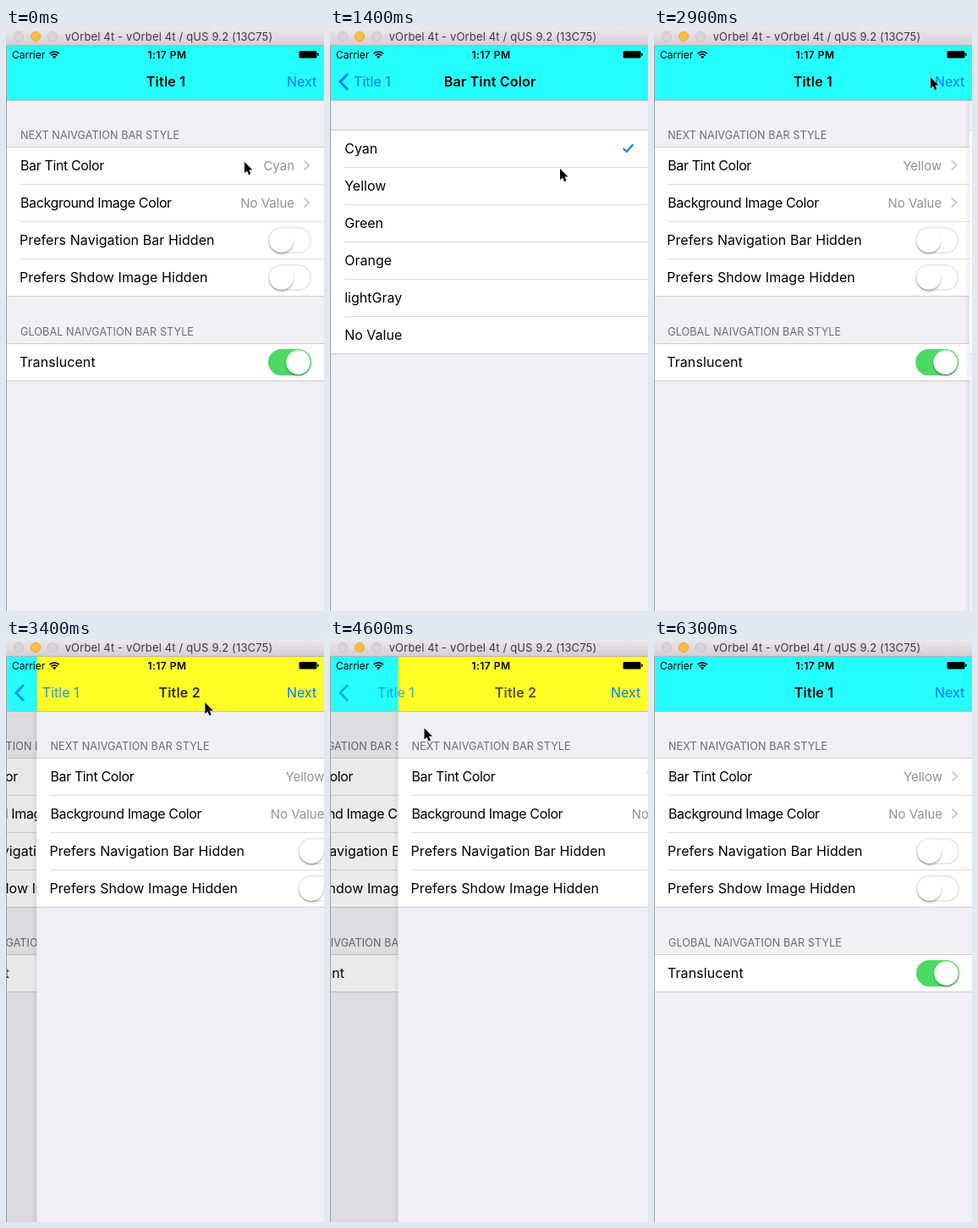
An HTML page that plays this animation: 376x688 px, repeating every 6.4 s.

```html
<!DOCTYPE html>
<html lang="en">
<head>
<meta charset="utf-8">
<title>Navigation bar demo</title>
<style>
  html, body { margin: 0; width: 100%; height: 100%; overflow: hidden; background: #efeff4; }
  svg { display: block; width: 376px; height: 688px; }
  text { font: 16px Inter, Roboto, sans-serif; white-space: pre; }
  .head { font-size: 12.6px; letter-spacing: .1px; fill: #6d6d72; }
  .detail { letter-spacing: -.38px; }
  .switch { letter-spacing: .08px; }
  .value { font-size: 15px; fill: #929297; text-anchor: end; }
  .title { font-weight: 600; letter-spacing: .2px; text-anchor: middle; }
  .link { fill: #007aff; }
  .status { font-size: 12px; }
  .clock { font-weight: 600; letter-spacing: .5px; text-anchor: middle; }
  .window { font-size: 13px; letter-spacing: .15px; fill: #3c3c3c; text-anchor: middle; }
  .line { fill: none; stroke-linecap: butt; }
</style>
</head>
<body>
<svg id="stage" viewBox="0 0 376 688"></svg>
<script>
const LOOP = 6400, STEP = 100, WIDTH = 375;
const CYAN = '#26ffff', YELLOW = '#ffff26', GROUND = '#efeff4';
const colors = ['Cyan', 'Yellow', 'Green', 'Orange', 'lightGray', 'No Value'];

// Markup helpers
const rect = (x, y, w, h, fill, extra = '') =>
  `<rect x="${x}" y="${y}" width="${w}" height="${h}" fill="${fill}" ${extra}/>`;
const text = (x, y, str, cls = '', extra = '') =>
  `<text x="${x}" y="${y}" class="${cls}" ${extra}>${str}</text>`;
const line = (d, color, width) =>
  `<path class="line" d="${d}" stroke="${color}" stroke-width="${width}"/>`;

// White block of 44px rows with its hairlines
function block(top, rows) {
  let out = rect(1, top, WIDTH, rows * 44 - 1, '#fff') + rect(1, top - 1, WIDTH, 1, '#cdccd1');
  for (let i = 1; i < rows; i++) out += rect(17, top + i * 44 - 1, WIDTH, 1, '#dddce0');
  return out + rect(1, top + rows * 44 - 1, WIDTH, 1, '#cdccd1');
}

function toggle(y, on) {
  const knob = on ? 345.5 : 325.5;
  return rect(310.7, y - 14.3, 49.6, 29.6, on ? '#4cd964' : '#fff',
      `rx="14.8" stroke="${on ? '#4cd964' : '#e3e3e3'}" stroke-width="1.4"`) +
    `<circle cx="${knob}" cy="${y + .5}" r="14.2" fill="#fff" filter="url(#drop)"/>`;
}

const detailRow = (y, label, value, id = '') =>
  text(17, y + 6, label, 'detail') + text(341, y + 6, value, 'value', id) +
  line(`M352.5 ${y - 5.5}l6 5.5-6 5.5`, '#c7c7cc', 1.8);

const switchRow = (y, label, on) => text(16, y + 6, label, 'switch') + toggle(y, on);

const styleSection = (value, id, mark = '') =>
  text(17, 130.5, 'NEXT NAIVGATION BAR STYLE', 'head') + block(141, 4) + mark +
  detailRow(162, 'Bar Tint Color', value, id) +
  detailRow(206, 'Background Image Color', 'No Value') +
  switchRow(250, 'Prefers Navigation Bar Hidden') +
  switchRow(294, 'Prefers Shdow Image Hidden');

const page = body => rect(1, 86, WIDTH, 602, GROUND) + body;
const bar = color => rect(1, 21, WIDTH, 64, color) + rect(1, 85, WIDTH, 1, '#b9bcc0');
const light = (x, fill, edge) =>
  `<circle cx="${x}" cy="10" r="5.6" fill="${fill}" stroke="${edge}" stroke-width=".8"/>`;

const home = page(
  styleSection('Cyan', 'id="chosen"', rect(1, 140, WIDTH, 45, '#d9d9d9', 'id="press"')) +
  text(17, 362.5, 'GLOBAL NAIVGATION BAR STYLE', 'head') + block(373, 1) +
  switchRow(394, 'Translucent', true));

const picker = page(block(121, 6) + rect(1, 164, WIDTH, 44, '#d9d9d9', 'id="tap"') +
  colors.map((name, i) => text(17, 148 + i * 44, name)).join('') +
  `<g id="check">${line('M346.5 142l4 4 7.5-8.5', '#007aff', 2.1)}</g>`);

document.getElementById('stage').innerHTML = `
  <defs>
    <filter id="drop" x="-30%" y="-30%" width="160%" height="170%">
      <feDropShadow dx="0" dy="1.8" stdDeviation="1.3" flood-opacity=".36"/>
    </filter>
    <linearGradient id="chrome" x2="0" y2="1">
      <stop stop-color="#ebe9eb"/><stop offset="1" stop-color="#d2d0d2"/>
    </linearGradient>
    <linearGradient id="edge"><stop stop-opacity="0"/><stop offset="1" stop-opacity=".07"/></linearGradient>
  </defs>
  <g id="under">${home}</g>
  ${rect(1, 86, WIDTH, 602, '#000', 'id="dim"')}
  ${bar(CYAN)}
  <g id="over">
    ${rect(-5, 86, 6, 602, 'url(#edge)')}
    ${rect(0, 21, 1, 64, '#000', 'opacity=".12"')}
    <g id="picker">${bar(CYAN)}${picker}</g>
    <g id="second">${bar(YELLOW)}${page(styleSection('Yellow'))}</g>
  </g>
  ${text(0, 69, 'Title 1', 'title', 'id="homeTitle"')}
  ${text(0, 69, '', 'title', 'id="overTitle"')}
  ${text(0, 69, 'Title 1', 'link', 'id="back"')}
  <g id="arrow">${line('M21 54l-9 9.5 9 9.5', '#007aff', 2.8)}</g>
  ${text(332, 69, 'Next', 'link', 'id="next"')}
  ${text(7, 35.5, 'Carrier', 'status')}
  ${line('M51.5 30.2q5.7-4.8 11.4 0M53.5 32.4q3.7-3 7.4 0', '#000', 1.6)}
  <path d="M55 33.8q2.2-1.6 4.4 0l-2.2 2.4z"/>
  ${text(190.5, 35.5, '1:17 PM', 'status clock')}
  ${rect(346.5, 27, 21, 8.6, '#000', 'rx="1.6"')}${rect(368.2, 29.6, 1.4, 3.4, '#000', 'rx=".7"')}
  ${rect(0, 0, 376, 20, 'url(#chrome)')}${rect(0, 20, 376, 1, '#b5b3b5')}
  ${light(15, '#d6d4d6', '#c1bfc1')}${light(35, '#fdbe41', '#e0a136')}${light(55, '#d6d4d6', '#c1bfc1')}
  ${text(192.5, 15, 'vOrbel 4t - vOrbel 4t / qUS 9.2 (13C75)', 'window')}
  ${rect(0, 21, 1, 667, '#a3a3a6')}
  <path id="mouse" d="M0 0V13.2L3 10.5 5 15.2 7.4 14.2 5.4 9.6H9.5Z" stroke="#fff" stroke-width="1" paint-order="stroke"/>`;

const el = Object.fromEntries([...document.querySelectorAll('[id]')].map(n => [n.id, n]));

// Pointer stops: time, x, y
const path = [
  [0, 282, 158], [1000, 282, 158], [1400, 272, 166], [1600, 267, 184], [1850, 267, 184],
  [2200, 59, 66], [2500, 59, 66], [2900, 327, 58], [3000, 340, 62], [3200, 340, 62],
  [3800, 26, 101], [4200, 5, 103], [4300, 5, 103], [5100, 289, 109], [5200, 330, 110],
  [5400, 384, 120], [LOOP, 384, 120]
];
const PUSH = 852, POP = 2510, PUSH2 = 3180, DRAG = 4300, RELEASE = 5200, REST = 5490;
const GRIP = 32; // pointer x at which the dragged page starts to follow

const clamp = v => Math.min(1, Math.max(0, v));

function pointer(t) {
  const i = path.findIndex(stop => stop[0] > t);
  const [t0, x0, y0] = path[i - 1], [t1, x1, y1] = path[i];
  const k = (t - t0) / (t1 - t0);
  return [x0 + (x1 - x0) * k, y0 + (y1 - y0) * k];
}

// Critically damped spring from 0 to 1
function spring(ms) {
  const s = Math.max(0, ms) * .018;
  return 1 - (1 + s) * Math.exp(-s);
}

// How far the upper page covers the home page
function cover(t) {
  if (t < POP) return spring(t - PUSH);
  if (t < PUSH2) return 1 - spring(t - POP);
  if (t < DRAG) return spring(t - PUSH2);
  if (t >= REST) return 0;
  const held = clamp(1 - (pointer(Math.min(t, RELEASE))[0] - GRIP) / WIDTH);
  return held * (1 - spring(t - RELEASE));
}

const place = (node, x, y = 0) => node.setAttribute('transform', `translate(${x} ${y})`);
const fade = (node, a) => node.setAttribute('opacity', clamp(a));

function draw(t) {
  const p = cover(t), q = cover(Math.max(0, t - 9)); // titles trail the page slightly
  const picking = t < 3150, picked = t >= 1800;
  const arrive = (q - .4) / .6, leave = 1 - 2.5 * q;

  place(el.under, -.3 * WIDTH * p);
  place(el.over, WIDTH * (1 - p));
  fade(el.over, p > 0 ? 1 : 0);
  fade(el.dim, .1 * p);
  fade(el.picker, picking ? 1 : 0);
  fade(el.second, picking ? 0 : 1);

  el.chosen.textContent = colors[picked ? 1 : 0];
  place(el.check, 0, picked ? 44 : 0);
  fade(el.tap, picked ? (2200 - t) / 300 : 0);
  fade(el.press, t < 800 || !picking ? 0 : t < POP ? 1 : p);

  place(el.homeTitle, 189 - 138 * q);
  fade(el.homeTitle, leave);
  el.overTitle.textContent = picking ? 'Bar Tint Color' : 'Title 2';
  place(el.overTitle, 189 + 150 * (1 - q));
  fade(el.overTitle, arrive);
  place(el.back, 28 + 138 * (1 - q));
  fade(el.back, arrive);
  fade(el.arrow, arrive);
  fade(el.next, picking ? leave : 1);

  place(el.mouse, ...pointer(t));
}

function tick() {
  const t = performance.now() % LOOP;
  draw(Math.floor(t / STEP) * STEP);
  requestAnimationFrame(tick);
}
tick();
</script>
</body>
</html>
```
